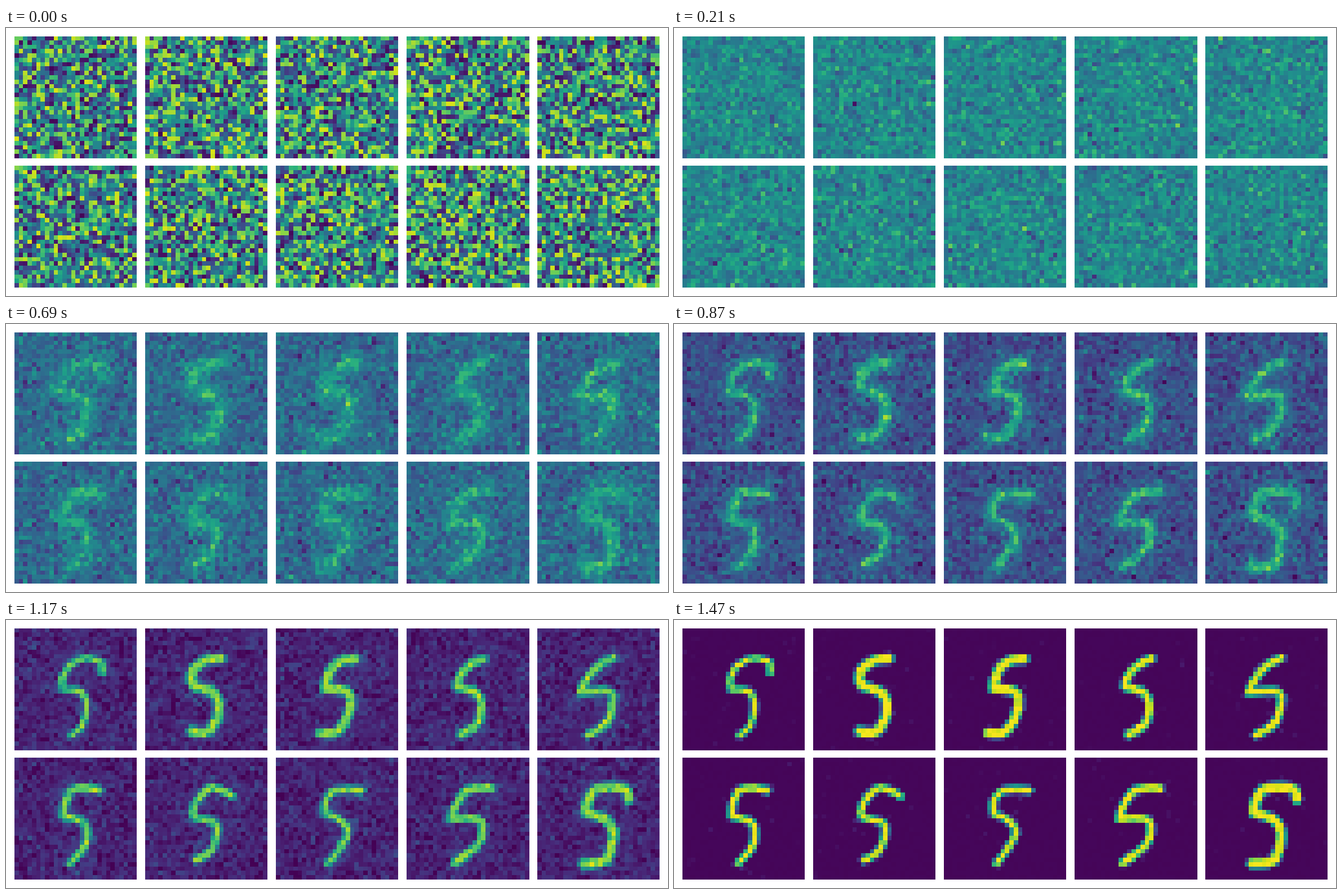
Recreate the animation shown at these times as a matplotlib script. Size 1175x477 px, loop 1.5 s.

```python
import numpy as np
import matplotlib.pyplot as plt
from matplotlib.animation import FuncAnimation

W, H = 1175, 477
DPI = 64  # a power of two keeps the pixel size exact
SIDE, CELLS = 217, 28
FRAMES, INTERVAL = 50, 30
KEEP = 0.82  # share of the noise carried from one step to the next

# Upper stroke of each digit, from the tip to the corner, in cells
TOPS = [
    [(20.1, 10.2), (19.7, 7.8), (16.1, 7.0), (12.5, 8.8), (11.0, 11.6), (11.2, 14.0)],
    [(17.4, 7.0), (13.9, 7.5), (11.1, 9.7), (10.6, 12.0), (11.4, 13.3)],
    [(18.4, 7.1), (15.6, 7.4), (13.0, 9.0), (11.7, 12.0), (11.4, 13.8)],
    [(17.5, 7.0), (14.7, 8.4), (12.2, 11.0), (11.5, 13.5)],
    [(17.4, 6.9), (14.5, 8.4), (11.9, 11.0), (9.9, 14.7)],
    [(19.4, 7.5), (16.0, 7.0), (12.9, 7.7), (11.5, 11.0), (11.3, 13.5)],
    [(20.0, 8.9), (17.8, 7.6), (14.8, 7.1), (12.0, 9.7), (11.0, 12.3), (11.4, 13.8)],
    [(19.6, 7.5), (16.2, 7.3), (13.0, 7.9), (11.4, 10.3), (11.5, 12.9)],
    [(19.4, 7.1), (16.6, 7.0), (13.4, 7.8), (11.2, 11.0), (10.1, 14.0)],
    [(21.0, 9.6), (20.3, 7.4), (17.0, 6.8), (13.2, 7.5), (11.5, 10.3), (11.2, 12.6)],
]
# Lower stroke, from the corner to the tail
TAILS = [
    [(15.3, 14.6), (16.5, 18.0), (15.4, 22.5), (13.0, 24.5)],
    [(15.9, 15.0), (16.9, 18.7), (15.9, 22.0), (13.9, 23.9), (10.6, 23.6)],
    [(16.3, 14.6), (17.1, 17.4), (15.9, 21.3), (13.7, 23.9), (10.1, 24.0)],
    [(15.8, 14.8), (17.0, 18.0), (16.0, 22.0), (12.3, 24.4)],
    [(16.6, 14.6), (17.2, 18.0), (15.7, 22.0), (11.7, 24.4)],
    [(15.7, 14.8), (16.6, 18.0), (15.5, 21.3), (12.9, 24.1)],
    [(15.9, 15.0), (16.4, 18.0), (14.8, 21.7), (11.7, 23.5)],
    [(14.6, 14.3), (16.4, 16.8), (15.2, 20.0), (12.1, 24.3)],
    [(16.0, 14.1), (17.3, 16.2), (16.2, 20.0), (11.0, 24.2)],
    [(15.7, 14.3), (17.4, 17.4), (16.6, 22.0), (14.8, 24.0), (10.8, 24.3)],
]
HALF = [0.72, 1.12, 1.1, 0.95, 0.92, 0.85, 0.82, 0.82, 0.92, 1.15]

# Schedule of the denoising, eased linearly between the keys
KEYS = [0, 1, 7, 15, 23, 35, 42, 48, 49]
MEAN = [0.48, 0.48, 0.46, 0.43, 0.34, 0.14, 0.065, 0.025, 0.016]
SPREAD = [0.27, 0.105, 0.095, 0.087, 0.085, 0.068, 0.042, 0.014, 0.001]
GAIN = [0, 0, 0.03, 0.11, 0.26, 0.57, 0.82, 0.94, 0.955]
SHARP = [0, 0, 0, 0.15, 0.4, 0.82, 0.95, 1, 1]


def spline(points, n=16):
    """Catmull-Rom curve through the points."""
    p = np.array([points[0], *points, points[-1]])
    t = np.linspace(0, 1, n)[:, None]
    parts = []
    for a, b, c, d in zip(p, p[1:], p[2:], p[3:]):
        parts.append(0.5 * (2 * b + (c - a) * t
                            + (2 * a - 5 * b + 4 * c - d) * t ** 2
                            + (3 * b - a - 3 * c + d) * t ** 3))
    return np.concatenate(parts)


def digit(top, tail, half):
    """Return the crisp stroke and its blurred halo on the cell grid."""
    path = np.concatenate([spline(top), spline([top[-1], *tail])])
    c = np.arange(CELLS) + 0.5
    dx = c[None, :, None] - path[:, 0]
    dy = c[:, None, None] - path[:, 1]
    dist = np.hypot(dx, dy).min(axis=2)
    return np.clip(half + 0.5 - dist, 0, 1), np.exp(-(dist / 2.4) ** 2)


def noise_steps(rng, shape):
    """Uniform noise that drifts into Gaussian noise, scaled to unit spread."""
    z = rng.uniform(-0.5, 0.5, shape)
    steps = [z / z.std()]
    for _ in range(FRAMES - 1):
        z = KEEP * z + np.sqrt(1 - KEEP ** 2) * rng.standard_normal(shape)
        steps.append(z / z.std())
    return steps


shapes = [digit(*args) for args in zip(TOPS, TAILS, HALF)]
crisp = np.array([s[0] for s in shapes])
halo = np.array([s[1] for s in shapes])
noise = noise_steps(np.random.default_rng(5), crisp.shape)


def panels(k):
    mean, spread, gain, sharp = (np.interp(k, KEYS, v)
                                 for v in (MEAN, SPREAD, GAIN, SHARP))
    late = np.interp(k, [45, 49], [0, 1])
    z = noise[k]
    shape = sharp * crisp + (1 - sharp) * halo
    specks = np.maximum(z - 1.9, 0) * 0.035 * (1 + 4 * halo)
    ripple = 0.025 * z * crisp
    img = mean + gain * shape + spread * z + late * (specks + ripple)
    return np.clip(img, 0, 0.985)


fig = plt.figure(figsize=(W / DPI, H / DPI), dpi=DPI, facecolor="white")
images = []
for i in range(10):
    x, y = 15 + 232 * (i % 5), 15 + 230 * (i // 5)
    ax = fig.add_axes([x / W, 1 - (y + SIDE) / H, SIDE / W, SIDE / H])
    ax.axis("off")
    images.append(ax.imshow(np.zeros((CELLS, CELLS)), cmap="viridis", vmin=0,
                            vmax=1, interpolation="nearest", aspect="auto"))


def update(k):
    for image, data in zip(images, panels(k)):
        image.set_data(data)
    return images


anim = FuncAnimation(fig, update, frames=FRAMES, interval=INTERVAL,
                     repeat=True, repeat_delay=0, blit=False)
plt.show()
```
